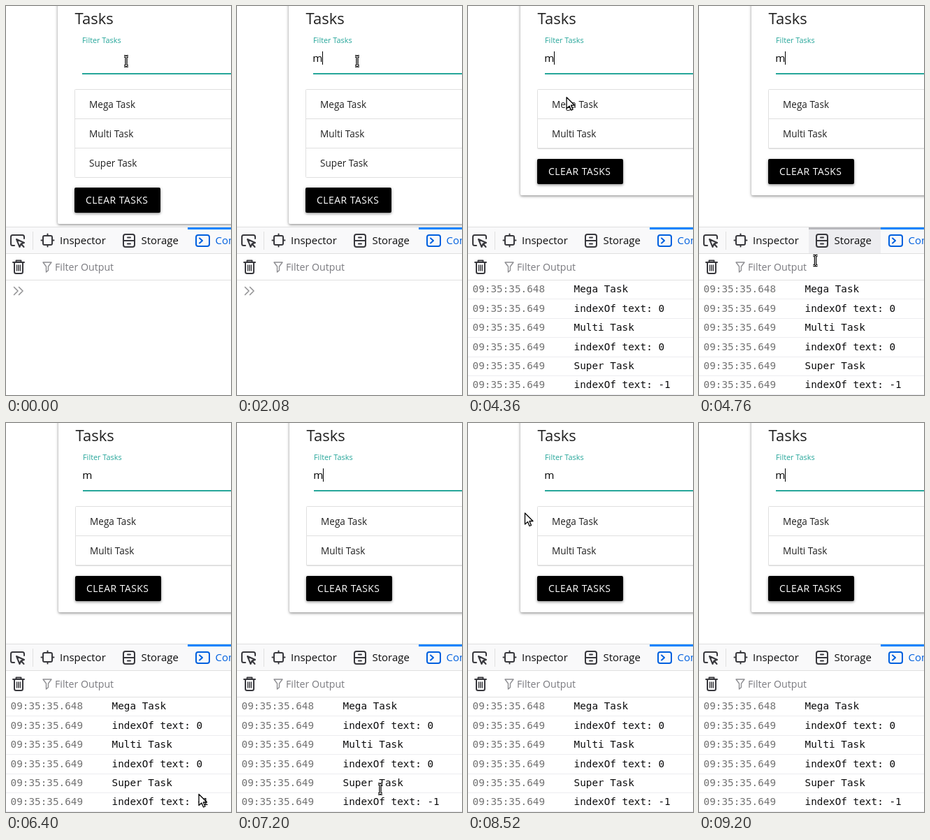
Animation of 322x557 px, one loop 9400 ms. Source, as an HTML page:

```html
<!DOCTYPE html>
<html lang="en">
<head>
<meta charset="utf-8">
<title>Task filter</title>
<style>
  html, body { margin: 0; width: 100%; height: 100%; overflow: hidden; background: #fff; }
  svg { display: block; width: 322px; height: 557px; }
  text { font-family: "Open Sans", "Noto Sans", sans-serif; font-weight: 500; white-space: pre; }
  .item { font-size: 13.6px; fill: #212121; }
  .tab { font-size: 15px; fill: #0c0c0d; }
  .log { font: 14.35px "DejaVu Sans Mono", monospace; fill: #0c0c0d; }
  .time { fill: #737373; }
  .raised { filter: drop-shadow(0 1px 2px rgba(0, 0, 0, .35)) drop-shadow(0 2px 1px rgba(0, 0, 0, .12)); }
  .icon { fill: none; stroke: #38383d; stroke-width: 2; stroke-linecap: round; stroke-linejoin: round; }
  .line { fill: none; stroke: #e0e0e0; }
  .row { stroke: #ededf0; }
</style>
</head>
<body>
<svg viewBox="0 0 322 557">
  <g id="page">
    <rect id="card" class="raised" x="74" y="-20" width="400" height="332" rx="2" fill="#fff"/>
    <text x="98.5" y="26" font-size="22" fill="#212121">Tasks</text>
    <text x="109" y="53" font-size="10.9" fill="#26a69a">Filter Tasks</text>
    <path d="M109 97H330" stroke="#26a69a" stroke-width="2"/>
    <text id="typed" x="108.2" y="80" font-size="15.2">m</text>
    <rect id="caret" y="65" width="1" height="19"/>
    <rect id="list" class="line" x="98.5" y="119.5" width="300" height="126" rx="1"/>
    <path class="line" d="M99 161.5H330M99 203.5H330"/>
    <text class="item" x="119" y="146">Mega Task</text>
    <text class="item" x="119" y="188">Multi Task</text>
    <text id="third" class="item" x="119" y="230">Super Task</text>
    <g id="button">
      <rect class="raised" x="98" y="260" width="123" height="36" rx="2"/>
      <text x="114" y="283" font-size="13.9" letter-spacing=".5" fill="#fff">CLEAR TASKS</text>
    </g>
  </g>

  <g id="devtools">
    <rect y="317" width="322" height="240" fill="#fff"/>
    <rect y="317" width="322" height="37" fill="#f9f9fa"/>
    <path class="line" d="M0 316.5H322M0 354.5H322M0 392.5H322M38.5 323V349"/>
    <g id="hover">
      <rect x="157" y="317" width="103" height="37" fill="#ededf0"/>
      <rect x="157" y="317" width="103" height="3" fill="#b8b8bc"/>
    </g>
    <rect x="260" y="317" width="62" height="3" fill="#0a84ff"/>

    <path class="icon" d="M12 343H9.5Q7 343 7 340.5V330.5Q7 328 9.5 328H23.5Q26 328 26 330.5V333"/>
    <path class="icon" fill="#38383d" d="M15 334L26 339 21.5 340.5 19.5 345ZM21.5 340.5L25.5 345"/>
    <g class="icon">
      <rect x="53" y="329" width="13" height="13" rx="2"/>
      <path d="M59.5 326.5V329M59.5 342V344.5M50.5 335.5H53M66 335.5H68.5"/>
    </g>
    <text class="tab" x="77" y="341">Inspector</text>
    <g class="icon">
      <rect x="168" y="327" width="16" height="18" rx="3"/>
      <path d="M168 336H184M174 331.5H178M174 340.5H178"/>
    </g>
    <text class="tab" x="193.5" y="341">Storage</text>
    <g class="icon" style="stroke:#0060df">
      <rect x="272" y="328" width="19" height="16" rx="3"/>
      <path d="M277 332.5L281 336 277 339.5"/>
    </g>
    <text class="tab" x="299.5" y="341" style="fill:#0060df">Console</text>

    <path class="icon" d="M10 367H26M14.5 366.5V364.5H21.5V366.5M12 368V380.5Q12 383 14.5 383H21.5Q24 383 24 380.5V368"/>
    <path class="icon" style="stroke-width:1.5" d="M15.5 371V379M18 371V379M20.5 371V379"/>
    <path class="icon" style="stroke:#8f8f93;stroke-width:1.4" d="M53 367H65L60.5 373V378.5L57.5 381V373Z"/>
    <text x="70" y="379" font-size="14.2" fill="#7b7b80">Filter Output</text>
    <path id="prompt" class="icon" style="stroke:#939395;stroke-width:1.6" d="M11.5 402.5L17 408 11.5 413.5M18.5 402.5L24 408 18.5 413.5"/>
    <g id="logs"></g>
  </g>

  <g id="cursor" stroke-linejoin="round">
    <g id="beam" fill="none">
      <path id="beamShape" d="M-3-7H-1L0-6 1-7H3M0-6V6M-3 7H-1L0 6 1 7H3" stroke="#000" stroke-width="3.4"/>
      <path d="M-3-7H-1L0-6 1-7H3M0-6V6M-3 7H-1L0 6 1 7H3" stroke="#fff"/>
    </g>
    <path id="arrow" d="M.5.5V16.5L4.5 13 7 19 9.5 18 7 12H12Z" fill="#fff" stroke="#000" stroke-width="1.3"/>
  </g>
</svg>
<script>
const LOOP = 9400, TICK = 40, BLINK = 1200;
const TYPED = 2000, FILTERED = 2120, LOGGED = 2240;
const $ = id => document.getElementById(id);
const show = (id, on) => $(id).setAttribute('visibility', on ? 'visible' : 'hidden');
const set = (id, name, value) => $(id).setAttribute(name, value);

const messages = [['Mega Task', 0], ['Multi Task', 0], ['Super Task', -1]]
  .flatMap(([name, index]) => [name, `indexOf text: ${index}`]);
$('logs').innerHTML = messages.map((message, i) => {
  const y = Math.ceil(410 + 27.4 * i);
  return `<text class="log time" x="6.5" y="${y}">09:35:35.64${i ? 9 : 8}</text>
    <text class="log" x="151.5" y="${y}">${message}</text>
    <path class="row" d="M0 ${y + 9.5}H322"/>`;
}).join('');

// Pointer stops: time, x, y, shape kept until the next stop.
const stops = [
  [0, 172, 79, 'beam'], [4200, 172, 79, 'beam'], [4320, 150, 104, 'arrow'],
  [4520, 103, 235, 'arrow'], [4640, 145, 312, 'arrow'], [4760, 166.5, 364.5, 'beam'],
  [5000, 175, 489, 'beam'], [5440, 175, 489, 'beam'], [5640, 270, 532, 'arrow'],
  [5680, 281, 536, 'arrow'], [5920, 281, 536, 'arrow'], [6160, 277, 532, 'arrow'],
  [6360, 277, 532, 'arrow'], [6400, 275.5, 531, 'arrow'], [6560, 279, 532, 'arrow'],
  [6720, 279, 532, 'arrow'], [6880, 263, 535, 'beam'], [7200, 205, 524, 'beam'],
  [7360, 174, 510, 'beam'], [7920, 174, 510, 'beam'], [8200, 140, 395, 'arrow'],
  [8520, 81, 128.5, 'arrow'], [8880, 44, 11, 'arrow'], [9040, 35, -25, 'arrow'],
  [LOOP, 35, -25, 'arrow']
];

function pointerAt(t) {
  const i = stops.findIndex(stop => stop[0] > t) - 1;
  const [t0, x0, y0, shape] = stops[i], [t1, x1, y1] = stops[i + 1];
  const k = (t - t0) / (t1 - t0);
  return { x: x0 + (x1 - x0) * k, y: y0 + (y1 - y0) * k, shape };
}

// The blink restarts, caret visible, when the key goes down.
function caretOn(t) {
  if (t < TYPED) return t >= 800;
  return Math.floor((t - TYPED + TICK) / BLINK) % 2 === 0;
}

function draw() {
  const t = Math.floor(performance.now() % LOOP / TICK) * TICK;
  const filtered = t >= FILTERED, logged = t >= LOGGED;

  set('page', 'transform', `translate(${filtered ? 1 : 0} 0)`);
  set('card', 'height', filtered ? 291 : 332);
  set('list', 'height', filtered ? 85 : 126);
  set('button', 'transform', `translate(0 ${filtered ? -41 : 0})`);
  show('third', !filtered);

  show('typed', t >= TYPED);
  set('caret', 'x', t >= TYPED ? 122 : 109);
  show('caret', caretOn(t));
  show('logs', logged);
  show('prompt', !logged);
  show('hover', t >= 4680 && t < 4800);

  const { x, y, shape } = pointerAt(t);
  set('cursor', 'transform', `translate(${x} ${y})`);
  show('beam', shape === 'beam');
  show('arrow', shape === 'arrow');
  requestAnimationFrame(draw);
}
draw();
</script>
</body>
</html>
```
